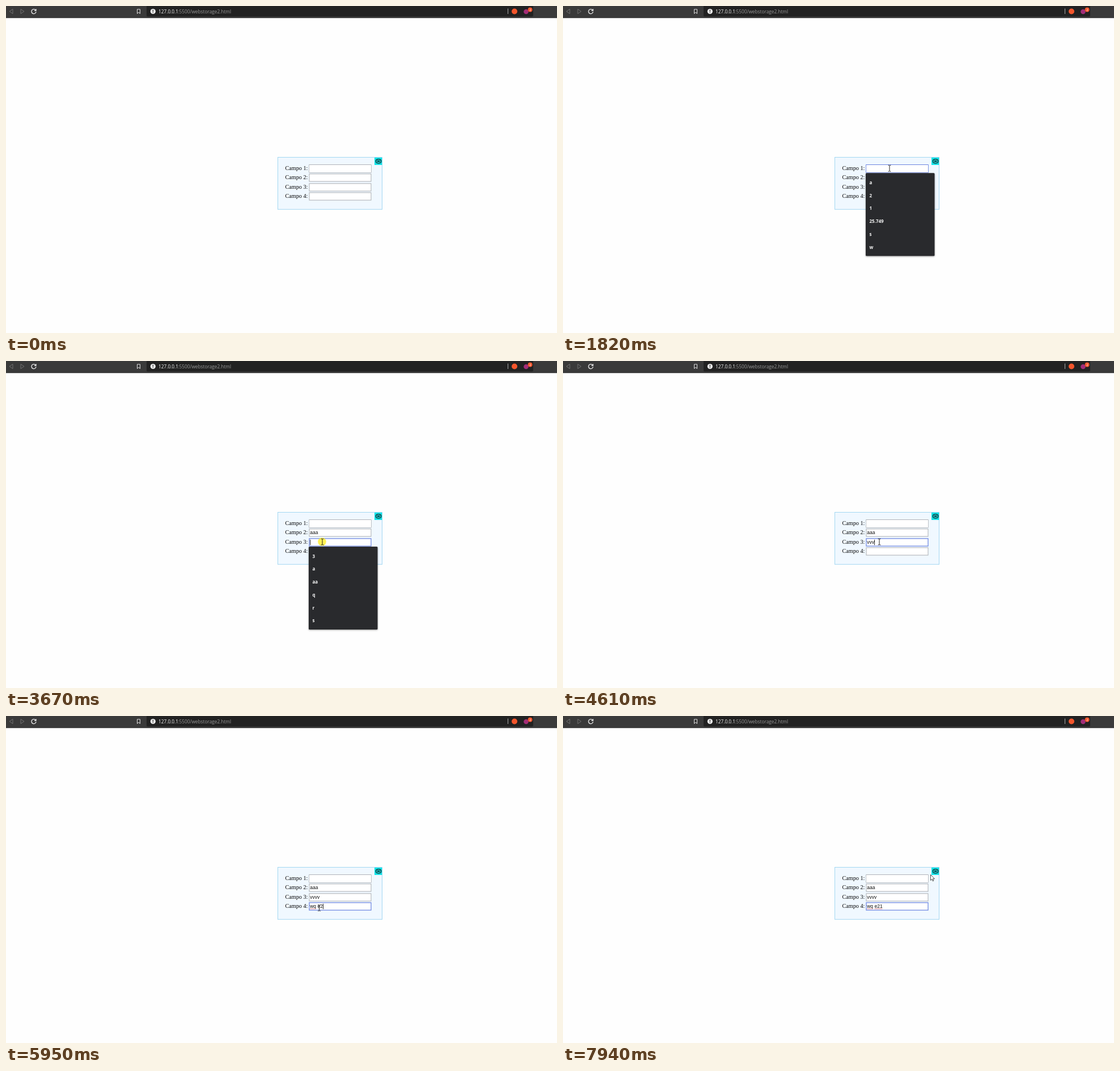
Write an HTML page with a canvas that moves like this. It is 972 by 576 pixels and loops after 8 s.

```html
<!DOCTYPE html>
<html lang="es">
<head>
<meta charset="utf-8">
<title>webstorage2</title>
<style>
  html, body { margin: 0; width: 100%; height: 100%; overflow: hidden; background: #fefefe; }
  canvas { display: block; }
</style>
</head>
<body>
<canvas id="stage" width="972" height="576"></canvas>
<script>
const c = document.getElementById('stage').getContext('2d');
const LOOP = 8000, PITCH = 16.4;
const SERIF = '10.2px "Liberation Serif", serif';
const SANS = '8.5px "Liberation Sans", sans-serif';
const UI = '8.27px "Open Sans", sans-serif';

// Typed text: [time, field, value]
const keys = [
  [1820, 0, '1'], [1920, 0, '12'], [2120, 0, '123'],
  [2900, 1, 'a'], [3160, 1, 'aa'], [3300, 1, 'aaa'],
  [4090, 2, 'v'], [4290, 2, 'vv'], [4480, 2, 'vvv'], [4640, 2, 'vvvv'],
  [5390, 3, 'w'], [5420, 3, 'wq'], [5620, 3, 'wq '], [5650, 3, 'wq e'],
  [5950, 3, 'wq e2'], [6120, 3, 'wq e21']
];
const clicks = [1460, 2610, 3610, 4970];

// Suggestions: [start, end, field, items]
const lists = [
  [1520, 1850, 0, ['a', '2', '1', '25.749', 's', 'w']],
  [2670, 2930, 1, ['2', 'aa', 's', 'e', 'a']],
  [2930, 3190, 1, ['aa', 'a']],
  [3660, 4120, 2, ['3', 'a', 'aa', 'q', 'r', 's']],
  [5030, 5450, 3, ['4', 'a', 's', 'e']]
];

// Pointer moves: [start, end, x0, y0, x1, y1]
const moves = [
  [240, 1060, 905, 568, 576, 286],
  [2250, 2600, 576, 286, 568, 300],
  [3360, 3600, 568, 300, 558, 318.5],
  [4700, 4950, 558, 318.5, 552.5, 338],
  [6150, 6410, 552.5, 338, 656, 355],
  [6640, 6980, 656, 355, 777, 363],
  [6980, 7370, 777, 363, 682, 295],
  [7470, 7940, 682, 295, 648.5, 279.5]
];

function rect(x, y, w, h, fill, r = 0) {
  c.fillStyle = fill;
  c.beginPath();
  c.roundRect(x, y, w, h, r);
  c.fill();
}

function disc(x, y, r, fill) {
  c.fillStyle = fill;
  c.beginPath();
  c.arc(x, y, r, 0, 7);
  c.fill();
}

function text(s, x, y, font, fill) {
  c.font = font;
  c.fillStyle = fill;
  c.fillText(s, x, y);
}

function line(d, color, width = 1) {
  c.strokeStyle = color;
  c.lineWidth = width;
  c.stroke(new Path2D(d));
}

function drawBar() {
  rect(0, 0, 972, 21, '#3a3a3a');
  rect(0, 20, 972, 1.3, '#303030');
  rect(248, 0, 682, 18.5, '#222222', [0, 0, 2, 2]);
  line('M12 5.5V13.5L6 9.5ZM26 5.5V13.5L32 9.5Z', '#777', 0.9);
  line('M52.2 7.2A4 4 0 1 0 53 10M53 5.2V8.2H50', '#eee', 1.3);
  line('M231.5 5.8H236.5V13.4L234 11.2L231.5 13.4Z', '#ddd');
  disc(259.3, 9.5, 4.6, '#f2f2f2');
  rect(258.7, 6.6, 1.2, 3.6, '#222');
  rect(258.7, 11, 1.2, 1.2, '#222');
  text('127.0.0.1', 269, 12.6, UI, '#f4f4f4');
  text(':5500/webstorage2.html', 303.3, 12.6, UI, '#999');
  rect(885, 4.5, 1, 9.5, '#aaa');
  disc(897, 9.5, 5, '#f4562c');
  disc(917.5, 10, 4.3, '#a32d78');
  disc(924.6, 6.6, 4, '#f4562c');
  text('2', 923.2, 8.6, '5.5px "Open Sans", sans-serif', '#fff');
}

function drawForm(t) {
  rect(479.5, 266.5, 184, 92, '#f0f8ff');
  c.lineWidth = 1;
  c.strokeStyle = '#a3d7f2';
  c.strokeRect(479.5, 266.5, 184, 91.7);
  rect(650, 267, 13.3, 13, '#12e5e9');
  line('M652.3 273.5C652.3 268.8 662 268.8 662 273.5S652.3 278.2 652.3 273.5Z', '#152b2d', 1.2);
  line('M655.3 271.5Q653.8 273.5 655.3 275.5M659 271.5Q660.5 273.5 659 275.5', '#152b2d');
  disc(657.1, 273.5, 1.4, '#152b2d');

  const focus = clicks.filter(k => t >= k + 30).length - 1;
  for (let i = 0; i < 4; i++) {
    const y = Math.round(i * PITCH), on = i === focus;
    const typed = keys.filter(k => k[1] === i && t >= k[0]);
    const value = typed.length ? typed[typed.length - 1][2] : '';
    text(`Campo ${i + 1}:`, 492.5, 289.4 + y, SERIF, '#080808');
    rect(535, 280, 109, 13, '#fff');
    rect(535, 280 + y, 109, 13, '#fff');
    c.lineWidth = on ? 1.2 : 1;
    c.strokeStyle = on ? '#6680df' : '#aaadb1';
    c.strokeRect(535, 279.8 + y, 109, 13.2);
    if (i === 0) c.strokeRect(535, 279.8, 109, 13.2);
    text(value, 536.2, 289.2 + y, SANS, '#111');
    if (i === 3) {
      if (t >= 5620) rect(536.2, 290.3 + y, 10.5, 0.8, '#d46a75');
      if (t >= 6640) rect(549.4, 290.3 + y, 14, 0.8, '#d46a75');
    }
    if (on) {
      const last = Math.max(clicks[i] + 30, ...typed.map(k => k[0]));
      if ((t - last) % 1040 < 520)
        rect(536.4 + c.measureText(value).width, 281.8 + y, 0.9, 9.4, '#111');
    }
  }
}

function drawList([, , field, items]) {
  const y = 294.2 + field * PITCH;
  c.save();
  c.shadowColor = 'rgba(0,0,0,.4)';
  c.shadowBlur = 3;
  c.shadowOffsetY = 1;
  rect(534, y, 121.5, 9.6 + items.length * 22.75, '#292a2d', 1.5);
  c.restore();
  items.forEach((s, i) =>
    text(s, 540.5, y + 19.7 + i * 22.75, 'bold 8px "Open Sans", sans-serif', '#f5f5f5'));
}

function pointerAt(t) {
  const m = moves.filter(v => t >= v[0]).pop();
  if (!m) return null;
  const p = Math.min(1, (t - m[0]) / (m[1] - m[0]));
  const e = p * p * (3 - 2 * p);
  return [m[2] + (m[4] - m[2]) * e, m[3] + (m[5] - m[3]) * e];
}

function drawPointer(t) {
  const pos = pointerAt(t);
  if (!pos) return;
  const [x, y] = pos;
  if (clicks.some(k => t >= k && t < k + 160)) disc(x - 0.5, y, 7.3, 'rgba(255,238,40,.8)');
  c.save();
  c.translate(x, y);
  const inField = x > 535 && x < 644 && y > 279 && y < 343;
  if (inField) {
    line('M-2.3 -5.3H-.7L0 -4.6L.7 -5.3H2.3M0 -4.6V4.6M-2.3 5.3H-.7L0 4.6L.7 5.3H2.3', '#222', 1);
  } else {
    const arrow = new Path2D('M0 0V10L2.3 7.9L3.8 11.3L5.4 10.6L3.9 7.3H7Z');
    c.fillStyle = '#fff';
    c.fill(arrow);
    c.strokeStyle = '#222';
    c.lineWidth = 0.8;
    c.stroke(arrow);
  }
  c.restore();
}

function draw(now) {
  const t = now % LOOP;
  rect(0, 0, 972, 576, '#fefefe');
  drawBar();
  drawForm(t);
  lists.filter(l => t >= l[0] && t < l[1]).forEach(drawList);
  drawPointer(t);
}

let start;
function tick(now) {
  start ??= now;
  draw(now - start);
  requestAnimationFrame(tick);
}
requestAnimationFrame(tick);
</script>
</body>
</html>
```
